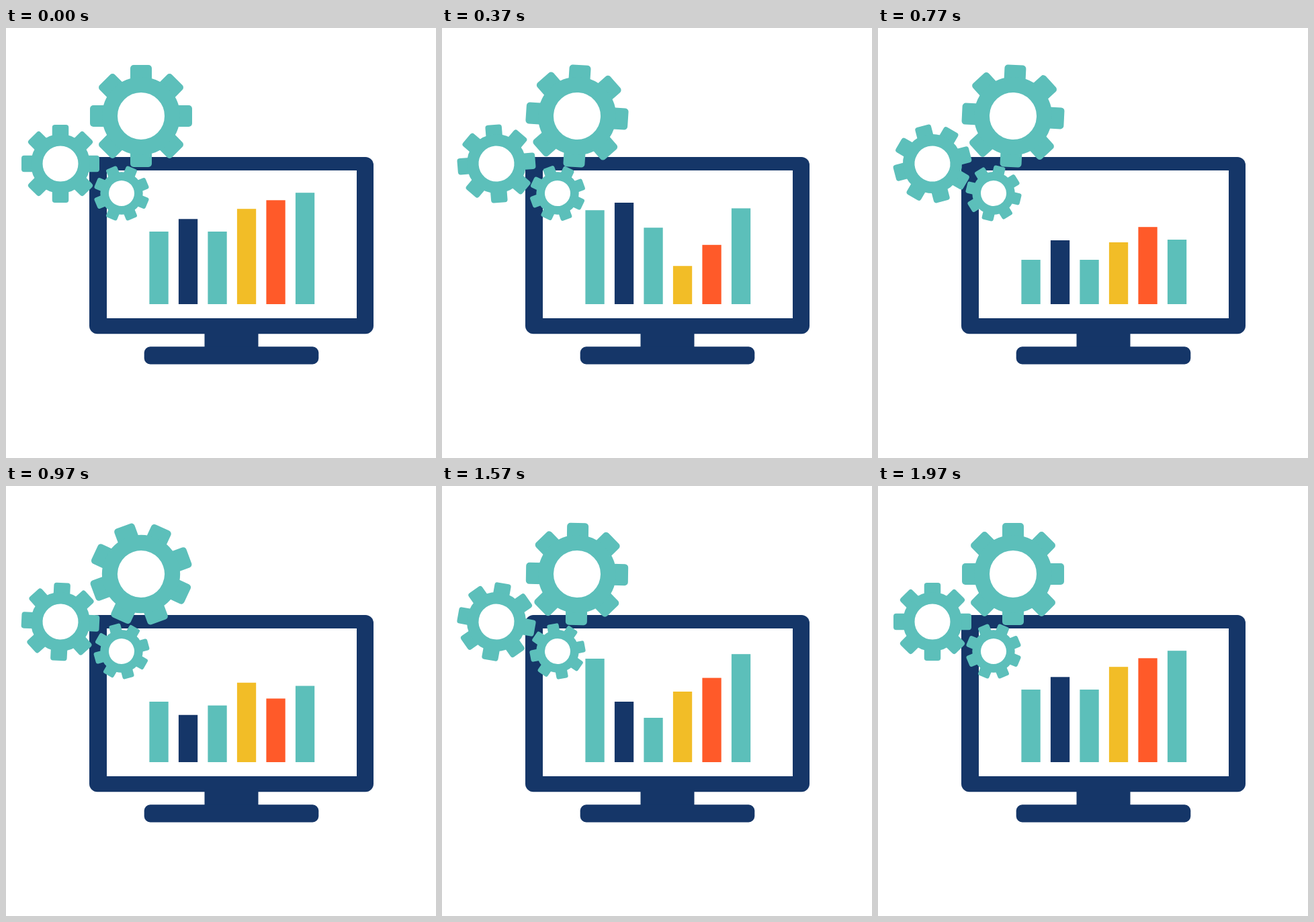
Animation, 640 px wide and 640 px high, one loop 2.01 s. Source, as an HTML page:

```html
<!DOCTYPE html>
<html lang="en">
<head>
<meta charset="utf-8">
<title>Analytics</title>
<style>
  html, body { margin: 0; width: 100%; height: 100%; overflow: hidden; background: #fff; }
  svg { display: block; width: 100vw; height: 100vh; }
  .navy { fill: #153668; }
  .teal { fill: #5cbfba; }
  .yellow { fill: #f2bd27; }
  .orange { fill: #ff5a29; }
</style>
</head>
<body>
<svg viewBox="0 0 640 640">
  <g class="navy">
    <rect x="124" y="192" width="423" height="263.3" rx="12"/>
    <rect x="295.5" y="450" width="80" height="30"/>
    <rect x="205.7" y="474.3" width="259.6" height="26.2" rx="9"/>
  </g>
  <rect x="150" y="212" width="372" height="220" fill="#fff"/>
  <g id="bars"></g>
  <g id="gears" class="teal"></g>
</svg>
<script>
const LOOP = 2010;
const LAST_FRAME = 59;
const LAST_STEP = 49;
const BASELINE = 411;

// Steps at which the bars change direction, and each bar's top edge there
const KEYS = [0, 9, 19, 29, 39, 49];
const BARS = [
  { color: 'teal',   tops: [303, 271.2, 345, 297, 257, 303] },
  { color: 'navy',   tops: [284.3, 260, 316, 365.5, 321, 284.3] },
  { color: 'teal',   tops: [303, 297.2, 345, 308.3, 345, 303] },
  { color: 'yellow', tops: [269.2, 354.2, 319, 266.5, 306, 269.2] },
  { color: 'orange', tops: [256.3, 322.8, 296.2, 336.5, 285.6, 256.3] },
  { color: 'teal',   tops: [245.2, 268.4, 315, 280, 250.2, 245.2] }
];

// turn: degrees per loop
const GEARS = [
  { x: 201, y: 131, outer: 76, body: 58, hole: 35, tooth: 32, round: 5, start: 0, turn: -225 },
  { x: 81, y: 202, outer: 58, body: 44, hole: 26.5, tooth: 24.5, round: 4, start: 0, turn: -270 },
  { x: 172, y: 246, outer: 41.2, body: 31.6, hole: 19, tooth: 17.5, round: 3, start: 22.5, turn: -720 }
];

function add(parent, tag, attrs) {
  const el = document.createElementNS('http://www.w3.org/2000/svg', tag);
  for (const name in attrs) el.setAttribute(name, attrs[name]);
  return parent.appendChild(el);
}

function makeGear(gear) {
  const group = add(document.getElementById('gears'), 'g', {});
  const mid = (gear.body + gear.hole) / 2;
  for (let i = 0; i < 8; i++) {
    add(group, 'rect', {
      x: -gear.tooth / 2, y: -gear.outer, width: gear.tooth,
      height: gear.outer - mid, rx: gear.round, transform: `rotate(${i * 45})`
    });
  }
  add(group, 'circle', {
    r: mid, fill: 'none', stroke: '#5cbfba', 'stroke-width': gear.body - gear.hole
  });
  return group;
}

const bars = BARS.map((bar, i) => add(document.getElementById('bars'), 'rect', {
  class: bar.color, x: 213.4 + i * 43.5, width: 28.3
}));
const gears = GEARS.map(makeGear);

// 25 steps per second shown on a 30 fps clock rounded to 10 ms
function stepAt(ms) {
  const frame = Math.min(LAST_FRAME, Math.floor(0.3 * Math.floor(ms / 10) + 0.15));
  return Math.ceil(frame * 5 / 6 - 0.5);
}

function topAt(tops, step) {
  let k = 0;
  while (k < KEYS.length - 2 && step >= KEYS[k + 1]) k++;
  const part = (step - KEYS[k]) / (KEYS[k + 1] - KEYS[k]);
  return tops[k] + (tops[k + 1] - tops[k]) * part;
}

function draw(step) {
  BARS.forEach((bar, i) => {
    const top = topAt(bar.tops, step);
    bars[i].setAttribute('y', top);
    bars[i].setAttribute('height', BASELINE - top);
  });
  GEARS.forEach((gear, i) => {
    const angle = gear.start + gear.turn * step / LAST_STEP;
    gears[i].setAttribute('transform', `translate(${gear.x} ${gear.y}) rotate(${angle})`);
  });
}

const began = performance.now();
function tick() {
  draw(stepAt((performance.now() - began) % LOOP));
  requestAnimationFrame(tick);
}
tick();
</script>
</body>
</html>
```
